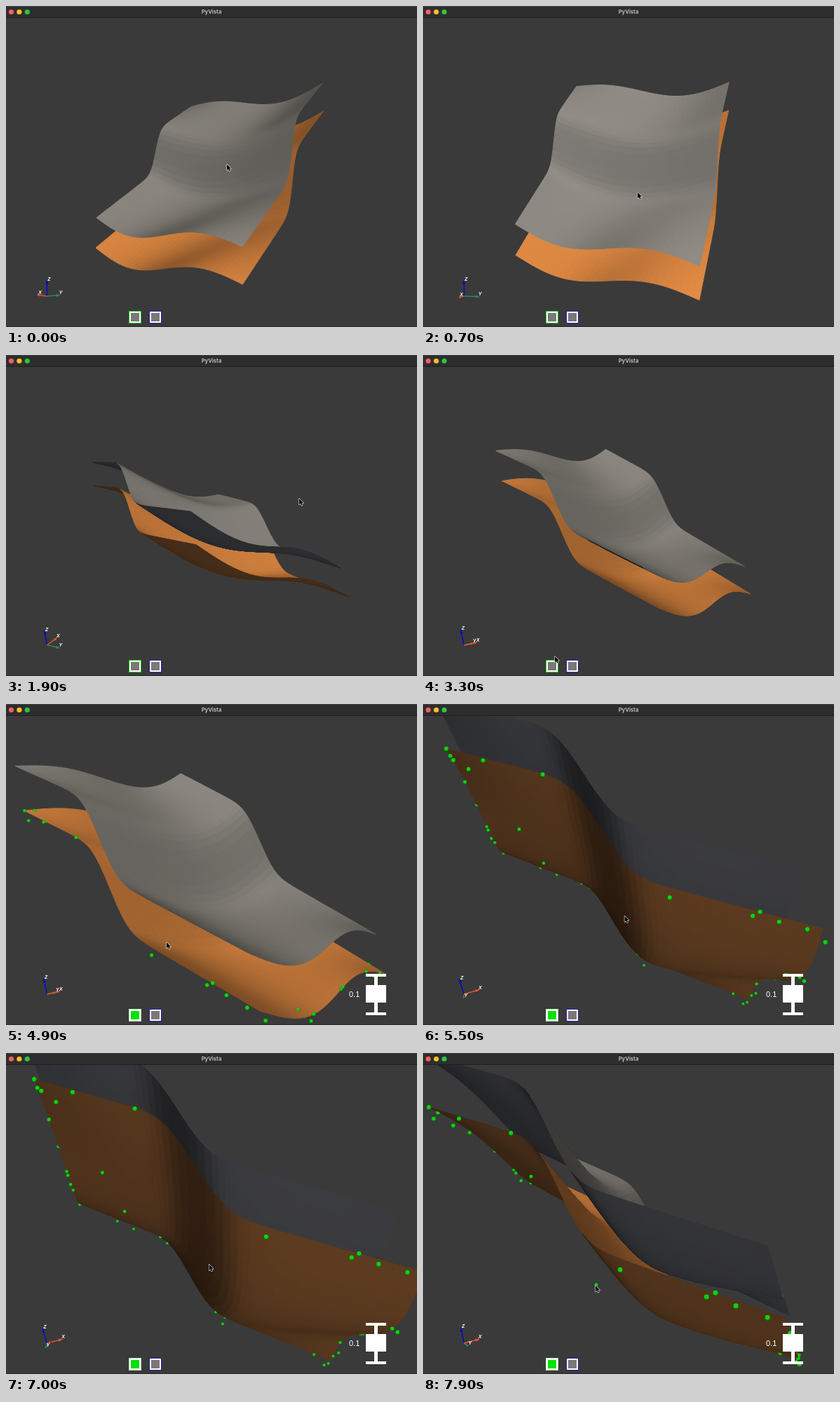
These frames come from a looping animation (586x458 px, 8000 ms). An HTML page with a canvas:

```html
<!DOCTYPE html>
<html lang="en">
<head>
<meta charset="utf-8">
<title>PyVista</title>
<style>
  html, body { margin: 0; width: 100%; height: 100%; overflow: hidden; background: #3a3a3a; }
  canvas { display: block; width: 586px; height: 458px; }
</style>
</head>
<body>
<canvas id="stage" width="586" height="458"></canvas>
<script>
const ctx = document.getElementById('stage').getContext('2d');
const LOOP = 8000, STEP = 100, FOCAL = 825, CX = 293, CY = 237;
const COLS = 64, ROWS = 32, SHEET_GAP = 42;
const CLICK_TIME = 3700, PICK_TIME = 3900, LAST_PICK_TIME = 7800;

// Camera angles in degrees, pan in pixels; x and y are the cursor
const START = { yaw: 38, pitch: -6, roll: 0, distance: 825, pan: 0, x: 315, y: 226 };
const MOVES = [
  { from: 0, to: 1300, goal: { yaw: 2, pitch: 14, x: 298, y: 300 } },
  { from: 1300, to: 1900, goal: { yaw: -43, pitch: -27, roll: 10.5, x: 418, y: 205 } },
  { from: 1900, to: 2700, goal: { yaw: -55, pitch: -1, roll: 12, x: 440, y: 262 } },
  { from: 2700, to: 3300, goal: { x: 188, y: 430 } },
  { from: 3900, to: 4700, goal: { distance: 571, x: 229, y: 340 } },
  { from: 4900, to: 5650, goal: { yaw: -106, pitch: -17, roll: 19, distance: 500, pan: -16, x: 302, y: 293 } },
  { from: 6800, to: 7700, goal: { yaw: -77, pitch: -13, roll: 11.5, distance: 490, pan: 9, x: 246, y: 332 } }
];

const GRAY = [157, 155, 153], ORANGE = [246, 154, 78];
const KEY = [.11, .766, .633], FILL = [0, -.966, .26];
const KEY_TINT = [.75, .735, .7], FILL_TINT = [.24, .25, .28];

const mix = (a, b, k) => a + (b - a) * k;
const dot = (a, b) => a[0] * b[0] + a[1] * b[1] + a[2] * b[2];

function stateAt(t) {
  const state = { ...START };
  for (const { from, to, goal } of MOVES) {
    const k = Math.min(1, Math.max(0, (t - from) / (to - from)));
    for (const name in goal) state[name] = mix(state[name], goal[name], k);
  }
  return state;
}

// A sloping sheet with a step across it, wavy ends and a sagging middle
function sheetPoint(u, v, drop) {
  const ramp = mix(mix(130, -65, u), mix(131, -102, u), v);
  const step = (33 + 3 * v) * (2 * u - 1 - Math.tanh((u - .42 - .025 * v) / .05));
  const sag = mix(13, 6, u) + 20 * Math.sin(Math.PI * u);
  const wave = mix(9, -11, u) * Math.sin(2 * Math.PI * v) - sag * Math.sin(Math.PI * v);
  return [206 * u - 103, 250 * v - 125, ramp + step + wave - drop];
}

function makeGrid(drop) {
  return Array.from({ length: COLS + 1 }, (_, i) =>
    Array.from({ length: ROWS + 1 }, (_, j) => sheetPoint(i / COLS, j / ROWS, drop)));
}
const SHEETS = [
  { grid: makeGrid(0), color: GRAY },
  { grid: makeGrid(SHEET_GAP), color: ORANGE }
];

let seed = 11;
const random = () => (seed = seed * 16807 % 2147483647) / 2147483647;

// Picks lie on the lower sheet: the four rims in turn, then its middle
const PICKS = Array.from({ length: 42 }, (_, i) => {
  const a = random(), b = random(), depth = SHEET_GAP + 12 * random() ** 3;
  const [u, v] = [[a, 0], [0, a], [a, 1], [1, a], [a, b]][i % 5];
  return sheetPoint(u, v, depth);
});

function makeView({ yaw, pitch, roll, distance, pan }) {
  const rad = Math.PI / 180;
  const [sy, cy, sp, cp, sr, cr] = [yaw, pitch, roll].flatMap(a => [Math.sin(a * rad), Math.cos(a * rad)]);
  // Axes: right, up, toward the viewer
  const rotate = ([x, y, z]) => {
    const right = y * cy - x * sy, toward = x * cy + y * sy;
    const up = z * cp - toward * sp;
    return [right * cr - up * sr, right * sr + up * cr, toward * cp + z * sp];
  };
  const project = p => {
    const cam = rotate(p), scale = FOCAL / (distance - cam[2]);
    return { cam, scale, x: CX + pan + cam[0] * scale, y: CY - cam[1] * scale };
  };
  return { rotate, project, distance };
}

function shade(a, b, c, d, base, distance) {
  const p = c.cam.map((value, i) => value - a.cam[i]);
  const q = d.cam.map((value, i) => value - b.cam[i]);
  let n = [p[1] * q[2] - p[2] * q[1], p[2] * q[0] - p[0] * q[2], p[0] * q[1] - p[1] * q[0]];
  const eye = [-a.cam[0], -a.cam[1], distance - a.cam[2]];
  const size = Math.hypot(...n) * (dot(n, eye) < 0 ? -1 : 1) || 1;
  n = n.map(value => value / size);
  const key = Math.max(0, dot(n, KEY)), fill = Math.max(0, dot(n, FILL)), head = Math.max(0, n[2]) * .25;
  const rgb = base.map((value, i) => Math.min(255, Math.round(value * (KEY_TINT[i] * key + FILL_TINT[i] * fill + head))));
  return `rgb(${rgb})`;
}

function fillQuad({ corners, color }) {
  ctx.fillStyle = ctx.strokeStyle = color;
  ctx.beginPath();
  for (const p of corners) ctx.lineTo(p.x, p.y);
  ctx.closePath();
  ctx.fill();
  ctx.stroke();
}

function disc(x, y, r, color) {
  ctx.fillStyle = color;
  ctx.beginPath();
  ctx.arc(x, y, r, 0, 7);
  ctx.fill();
}

function ball(x, y, r) {
  disc(x, y, r, '#087a08');
  disc(x, y - r * .15, r * .84, '#0fd20f');
}

function drawScene(view, showPicks) {
  const items = [];
  for (const { grid, color } of SHEETS) {
    const pts = grid.map(row => row.map(view.project));
    for (let i = 0; i < COLS; i++) for (let j = 0; j < ROWS; j++) {
      const corners = [pts[i][j], pts[i + 1][j], pts[i + 1][j + 1], pts[i][j + 1]];
      const depth = corners.reduce((sum, p) => sum + p.cam[2], 0) / 4;
      items.push({ corners, depth, color: shade(...corners, color, view.distance) });
    }
  }
  if (showPicks) for (const pick of PICKS) {
    const p = view.project(pick);
    items.push({ ball: p, depth: p.cam[2] + 4 });
  }
  items.sort((a, b) => a.depth - b.depth);
  ctx.lineWidth = 1;
  ctx.lineJoin = 'round';
  for (const item of items) {
    if (item.ball) ball(item.ball.x, item.ball.y, item.ball.scale * 1.6);
    else fillQuad(item);
  }
}

function label(text, x, y, font, color) {
  ctx.font = font;
  ctx.fillStyle = color;
  ctx.fillText(text, x, y);
}

function drawAxes(view) {
  const axes = [['X', '#f0502f', [1, 0, 0]], ['Y', '#2e8b57', [0, 1, 0]], ['Z', '#0808c8', [0, 0, 1]]]
    .map(([name, color, dir]) => ({ name, color, dir: view.rotate(dir) }))
    .sort((a, b) => a.dir[2] - b.dir[2]);
  const ox = 58.5, oy = 414, length = 23;
  ctx.textAlign = 'center';
  for (const { color, dir } of axes) {
    const dx = dir[0] * length, dy = -dir[1] * length, reach = Math.hypot(dx, dy) || 1;
    const nx = -dy / reach * 2, ny = dx / reach * 2;
    ctx.strokeStyle = ctx.fillStyle = color;
    ctx.lineWidth = 1.5;
    ctx.beginPath();
    ctx.moveTo(ox, oy);
    ctx.lineTo(ox + dx * .85, oy + dy * .85);
    ctx.stroke();
    ctx.beginPath();
    ctx.moveTo(ox + dx * 1.06, oy + dy * 1.06);
    ctx.lineTo(ox + dx * .75 + nx, oy + dy * .75 + ny);
    ctx.lineTo(ox + dx * .75 - nx, oy + dy * .75 - ny);
    ctx.fill();
  }
  for (const { name, dir } of axes)
    label(name, ox + dir[0] * 21 + 3, oy - dir[1] * 21 - 1.5, 'italic bold 7px "Liberation Sans", sans-serif', '#fff');
}

function box(x, y, w, h, color) {
  ctx.fillStyle = color;
  ctx.fillRect(x, y, w, h);
}

function button(x, border, center) {
  box(x, 435, 18, 18, border);
  box(x + 1, 436, 16, 16, '#fff');
  box(x + 3, 438, 12, 12, center);
}

function drawSlider() {
  box(513, 385, 29, 4, '#fff');
  box(525, 388, 5, 53, '#fff');
  box(513, 401, 29, 25, '#fff');
  box(513, 440, 29, 4, '#fff');
  ctx.textAlign = 'left';
  label('0.1', 489, 418, '11px "Liberation Sans", sans-serif', '#fff');
}

function drawTitleBar() {
  box(0, 0, 586, 17, '#2d2d2d');
  box(0, 0, 586, 1, '#414141');
  box(0, 16, 586, 1, '#1f1f1f');
  ['#ff5f57', '#febc2e', '#28c840'].forEach((color, i) => disc(7.5 + 11.4 * i, 8.5, 3.6, color));
  ctx.textAlign = 'center';
  label('PyVista', 293, 11.3, 'bold 7.6px Inter, sans-serif', '#b9b9b9');
}

function drawCursor(x, y) {
  ctx.save();
  ctx.translate(x, y);
  const path = new Path2D('M0 0V8.6L2 6.8L3.4 9.8L4.8 9.1L3.5 6.2H6.2Z');
  ctx.lineWidth = 1.2;
  ctx.strokeStyle = '#e8e8e8';
  ctx.stroke(path);
  ctx.fillStyle = '#000';
  ctx.fill(path);
  ctx.restore();
}

function draw(t) {
  const state = stateAt(t), view = makeView(state);
  const active = t >= CLICK_TIME, picking = t >= PICK_TIME;
  box(0, 0, 586, 458, '#3a3a3a');
  drawScene(view, picking);
  if (t >= LAST_PICK_TIME) ball(247, 331, 2.8);
  drawAxes(view);
  button(175, active ? '#b9e8b9' : '#18c818', active ? '#08e008' : '#7d7777');
  button(204, '#2020b4', '#7d7777');
  if (picking) drawSlider();
  drawTitleBar();
  box(0, 457, 586, 1, '#2a2a2a');
  drawCursor(state.x, state.y);
}

const start = performance.now();
let shown = -1;
function tick() {
  const elapsed = Math.max(0, performance.now() - start) % LOOP;
  const t = Math.floor(elapsed / STEP) * STEP;
  if (t !== shown) draw(shown = t);
  requestAnimationFrame(tick);
}
tick();
</script>
</body>
</html>
```
